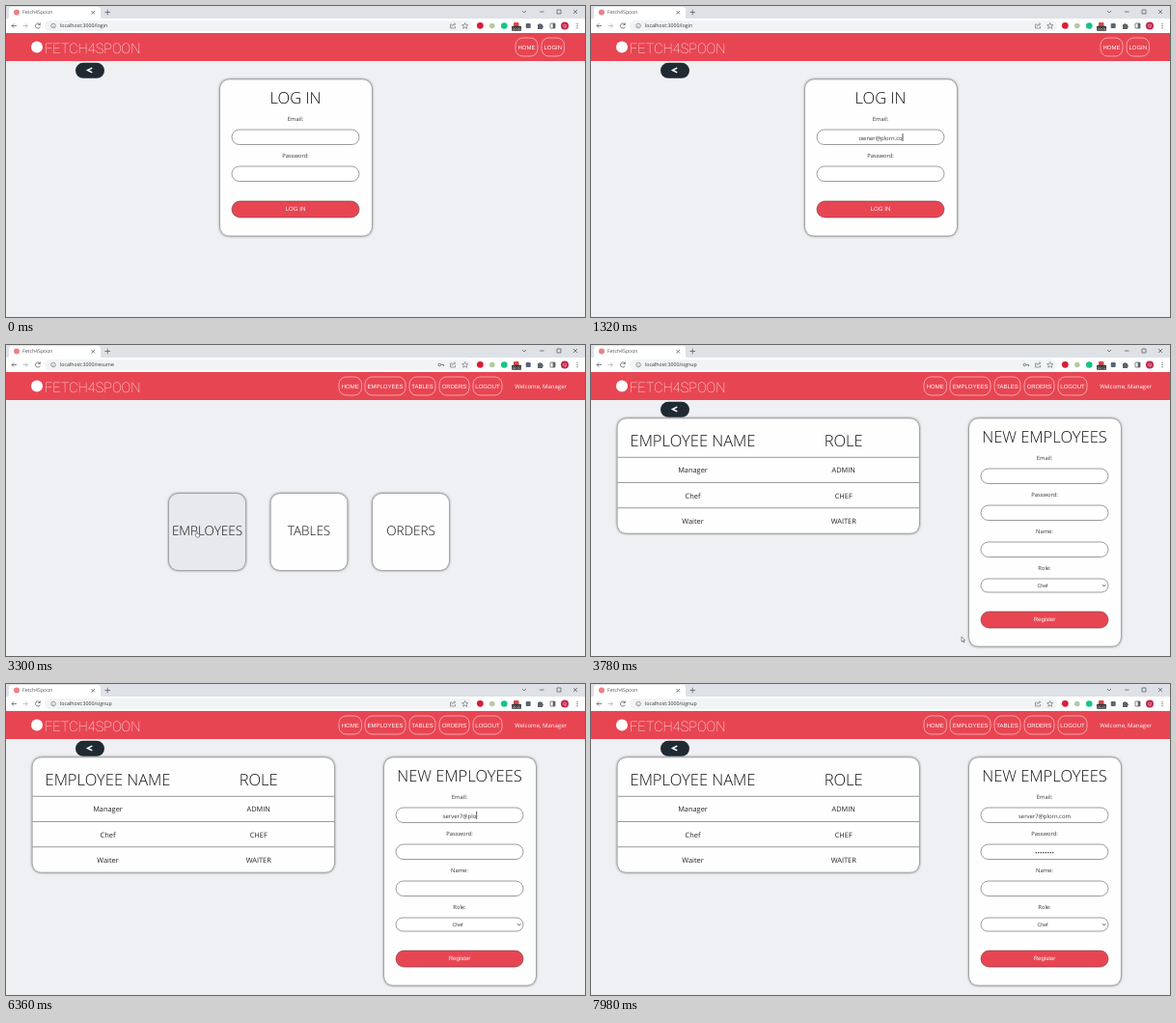
An HTML page that plays this animation: 600 by 322 pixels, repeating every 8 s.

```html
<!DOCTYPE html>
<html lang="en">
<head>
<meta charset="utf-8">
<title>Fetch4Spoon</title>
<style>
html, body { margin: 0; width: 100%; height: 100%; overflow: hidden; background: #eff0f3; }
svg { display: block; width: 600px; height: 322px; font-family: "Open Sans", sans-serif; text-rendering: geometricPrecision; }
.card { fill: #fefefe; filter: drop-shadow(0 0 1.6px #000d); }
.field { fill: #fff; stroke: #666; stroke-width: .65; }
.red { fill: #e84552; stroke: #6b3a42; stroke-width: .6; }
.nav { fill: none; stroke: #fff; stroke-width: .5; }
.arial { font-family: "Liberation Sans", Arial, sans-serif; }
.light { font-weight: 300; }
.line { fill: none; stroke: #5f6368; stroke-width: .8; }
</style>
</head>
<body>
<svg id="stage" viewBox="0 0 600 322"></svg>
<script>
const LOOP = 8000, RED = '#e84552';
const stage = document.getElementById('stage');

const rect = (x, y, w, h, r, attrs) =>
  `<rect x="${x}" y="${y}" width="${w}" height="${h}" rx="${r}" ${attrs}/>`;
const dot = (x, y, r, fill) => `<circle cx="${x}" cy="${y}" r="${r}" fill="${fill}"/>`;
const path = (d, attrs = 'class="line"') => `<path d="${d}" ${attrs}/>`;
const text = (s, x, y, size, attrs = '', anchor = 'middle') =>
  `<text x="${x}" y="${y}" font-size="${size}" text-anchor="${anchor}" ${attrs}>${s}</text>`;
const group = (id, body) => `<g id="${id}">${body}</g>`;
const arial = fill => `class="arial" fill="${fill}"`;
const light = 'class="light" fill="#111"';

const navButton = (s, x, w) =>
  rect(x, 33, w, 19, 7.5, 'class="nav"') + text(s, x + w / 2, 44.7, 6, arial('#fff'));
const input = (label, x, y, id, size = 5.9) =>
  text(label, x, y - 9, 5.8, 'fill="#333"') + rect(x - 66, y, 132, 15.5, 7.75, 'class="field"') +
  (id ? text('', x, y + 10.5, size, `id="${id}" fill="#333"`) : '');
const submit = (label, x, y) =>
  rect(x - 66, y, 132, 17, 8.5, 'class="red"') + text(label, x, y + 10.4, 6.1, arial('#fff'));
const tile = (label, x, id = '') =>
  rect(x, 154, 79, 79, 9, `class="card" id="${id}"`) + text(label, x + 39.5, 196.6, 13.5, light);

const browser =
  rect(0, 0, 600, 14, 0, 'fill="#dee1e6"') +
  path('M0 14Q3 14 3 11V4Q3 1 6 1H95Q98 1 98 4V11Q98 14 101 14Z', 'fill="#fff"') +
  rect(0, 13, 600, 15, 0, 'fill="#fff"') +
  dot(11, 6.5, 3, '#ee8088') + text('Fetch4Spoon', 17, 8.4, 5.2, 'fill="#555"', 'start') +
  path('M88.5 5l3.5 3.5m0-3.5l-3.5 3.5M102.5 6.5h5.5m-2.75-2.75v5.5') +
  path('M535 5l2 2 2-2M553 6h4.5M571 4h4v4h-4zM588 4l4 4m0-4l-4 4') +
  rect(40, 15, 443, 11, 5.5, 'fill="#f1f3f4"') +
  path('M11 20.5H6m2.2-2.2L6 20.5l2.2 2.2M35 19a2.5 2.5 0 1 0 .3 2.5M35.4 17.5V19.5H33.4') +
  path('M17.5 20.5h5m-2.2-2.2l2.2 2.2-2.2 2.2', 'class="line" style="stroke:#b5b8bc"') +
  path('M46.8 20.5a2.3 2.3 0 1 0 4.6 0a2.3 2.3 0 1 0-4.6 0M49.1 20.3v1.4', 'class="line" style="stroke-width:.6"') +
  text('', 56, 22.3, 5.25, 'id="address" fill="#333"', 'start') +
  group('key', path('M448 20.5a1.3 1.3 0 1 0 2.6 0a1.3 1.3 0 1 0-2.6 0M450.6 20.5h3v1.5')) +
  path('M462.5 19H460.5v4h5v-2M462 21.5q.3-2.5 3.5-2.7m-1.2-1.3l1.4 1.3-1.4 1.3', 'class="line" style="stroke-width:.6"') +
  path('M475.7 17.4l.9 2.1 2.2.2-1.7 1.4.6 2.2-2-1.2-2 1.2.6-2.2-1.7-1.4 2.2-.2Z', 'class="line" style="stroke-width:.6"') +
  dot(491.3, 20.3, 3.4, '#d51f37') + dot(503.8, 20.5, 2.8, '#b4c9a0') + dot(516.3, 20.5, 3.3, '#16c386') +
  rect(526, 17, 5.5, 4.5, 1, 'fill="#d7474c"') + rect(524, 20.8, 10, 5, .8, 'fill="#333"') +
  text('', 529, 24.6, 3.5, 'id="timer" fill="#fff"') +
  rect(538.7, 18, 5, 5, 1, 'fill="#596575"') +
  path('M551 19h1.4a1 1 0 1 1 2 0H556v1.5a1 1 0 1 1 0 2V24h-5Z', 'fill="#5f6368"') +
  rect(564, 18, 5, 5, .4, 'class="line"') + rect(566.6, 18, 2.4, 5, 0, 'fill="#5f6368"') +
  dot(579, 20.5, 4, '#c2274c') + text('Q', 579, 22.3, 4.6, arial('#fff')) +
  [18.3, 20.5, 22.7].map(y => dot(592, y, .65, '#5f6368')).join('');

const header = rect(0, 28, 600, 29, 0, `fill="${RED}"`) + dot(32, 42.5, 6, '#fff') +
  text('FETCH4SPOON', 40, 48.5, 14.5, 'style="font-family:Roboto,sans-serif;font-weight:200" fill="#fff"', 'start');

const back = group('back', rect(72, 58.8, 30, 16, 8, 'fill="#202a33"') +
  path('M89.3 64.1l-4.8 2.4 4.8 2.4', 'fill="none" stroke="#fff" stroke-width="1.5"'));

const login = navButton('HOME', 528, 23) + navButton('LOGIN', 555, 23.5) +
  rect(222, 76.3, 157, 161.5, 9, 'class="card"') + text('LOG IN', 300, 101, 16.5, light) +
  input('Email:', 300, 128, 'email') + input('Password:', 300, 166, 'pass', 6.6) + submit('LOG IN', 300, 202);

const staffNav = navButton('HOME', 345, 23.5) + navButton('EMPLOYEES', 372, 42) +
  navButton('TABLES', 418, 27) + navButton('ORDERS', 449, 31) + navButton('LOGOUT', 484, 30) +
  text('Welcome, Manager', 527.3, 44.7, 6, 'fill="#fff"', 'start');

const resume = tile('EMPLOYEES', 169, 'hover') + tile('TABLES', 274.5) + tile('ORDERS', 380);

const row = ([name, role], i) => path(`M27.5 ${116.3 + i * 26.2}H340`, 'stroke="#666" stroke-width=".65"') +
  text(name, 105.5, 132.4 + i * 26.2, 7.4, 'fill="#222"') + text(role, 261.7, 132.4 + i * 26.2, 7.4, 'fill="#222"');

const signup = rect(27.5, 76.3, 312.5, 118.5, 9, 'class="card"') +
  text('EMPLOYEE NAME', 105.5, 105, 16.5, light) + text('ROLE', 261.7, 105, 16.5, light) +
  [['Manager', 'ADMIN'], ['Chef', 'CHEF'], ['Waiter', 'WAITER']].map(row).join('') +
  rect(392, 76.3, 157, 235.5, 9, 'class="card"') + text('NEW EMPLOYEES', 470, 101, 16.5, light) +
  input('Email:', 470, 128, 'newEmail') + input('Password:', 470, 166, 'newPass', 6.6) + input('Name:', 470, 204) +
  text('Role:', 470, 233, 5.8, 'fill="#333"') + rect(404, 242, 132, 14, 7, 'class="field"') +
  text('Chef', 468, 250.8, 5.2, arial('#333')) +
  path('M530 248.2l1.7 1.7 1.7-1.7', 'fill="none" stroke="#222" stroke-width=".8"') +
  submit('Register', 470, 276);

const outline = 'fill="#fff" stroke="#333" stroke-width=".5"';
const pointer = group('pointer',
  group('arrow', path('M0 0V5.2L1.3 4.1L2.2 6.1L3 5.7L2.2 3.8H3.8Z', outline)) +
  group('hand', path('M0 0Q.6-.6 1.2 0V2.2L3.4 2.7Q3.9 2.9 3.7 3.7L3.2 6H.6L-1.1 3.7Q-1 2.9 0 3.5Z', outline)) +
  group('beam', path('M-1-3Q0-3 0-2.4Q0-3 1-3M0-2.4V2.4M-1 3Q0 3 0 2.4Q0 3 1 3', 'fill="none" stroke="#222" stroke-width=".6"')));

stage.innerHTML = rect(0, 0, 600, 322, 0, 'fill="#eff0f3"') + browser + header + back +
  group('login', login) + group('staffNav', staffNav) + group('resume', resume) + group('signup', signup) +
  path('', 'id="caret" stroke="#111" stroke-width=".7"') + pointer;

const el = Object.fromEntries([...stage.querySelectorAll('[id]')].filter(e => e.id).map(e => [e.id, e]));
const show = (id, on) => { el[id].style.display = on ? '' : 'none'; };

// Each field: text, focus time, first key, ms per key, blur time
const fields = {
  email: ['owner@plorn.com', 300, 470, 60, 1560],
  pass: ['•'.repeat(8), 1560, 1610, 90, 2500],
  newEmail: ['server7@plorn.com', 4920, 5690, 60, 6960],
  newPass: ['•'.repeat(8), 6960, 7000, 88, LOOP]
};

// Pointer stops: time, x, y
const trail = [
  [2460, 322, 262], [2640, 306.5, 208], [2760, 306.5, 208], [2940, 250, 261],
  [3240, 197, 193], [3420, 197, 193], [3720, 384, 302], [3900, 384, 302],
  [4080, 402, 286], [4320, 402, 286], [4500, 425, 248], [4860, 470, 136], [5690, 470, 136]
];

function drawField(id, t) {
  const [value, focus, start, step, blur] = fields[id];
  const count = Math.max(0, Math.min(value.length, Math.floor((t - start) / step)));
  el[id].textContent = value.slice(0, count);
  if (t < focus || t >= blur) return;
  const lastKey = count ? start + count * step : focus;
  if ((t - lastKey) % 360 >= 180) return;
  const x = +el[id].getAttribute('x') + (count ? el[id].getComputedTextLength() / 2 : 0) + .4;
  const y = el[id].getAttribute('y') - 6.5;
  el.caret.setAttribute('d', `M${x} ${y}v8`);
}

function drawPointer(t) {
  const i = trail.findIndex(p => p[0] > t);
  show('pointer', i > 0);
  if (i < 1) return;
  const [t0, x0, y0] = trail[i - 1], [t1, x1, y1] = trail[i];
  const u = (t - t0) / (t1 - t0), k = u * u * (3 - 2 * u);
  const x = x0 + (x1 - x0) * k, y = y0 + (y1 - y0) * k;
  const inside = (l, top, w, h) => x > l && x < l + w && y > top && y < top + h;
  const hover = t >= 2820 && t < 3420 && inside(169, 154, 79, 79);
  const hand = hover || t < 2820 && inside(234, 202, 132, 17);
  const beam = t > 3420 && [128, 166, 204].some(top => inside(404, top, 132, 15.5));
  el.pointer.setAttribute('transform', `translate(${x} ${y})`);
  el.hover.style.fill = hover ? '#e7e9ec' : '';
  show('hand', hand);
  show('beam', beam);
  show('arrow', !hand && !beam);
}

function draw(now) {
  const t = now % LOOP;
  const page = t < 2820 ? 'login' : t < 3420 ? 'resume' : 'signup';
  for (const id of ['login', 'resume', 'signup']) show(id, id === page);
  show('staffNav', page !== 'login');
  show('back', page !== 'resume');
  show('key', t >= 2520 && t < 4500);
  el.address.textContent = 'localhost:3000/' + page;
  el.timer.textContent = '00:' + String(Math.floor(t / 310)).padStart(2, '0');
  el.caret.setAttribute('d', '');
  for (const id in fields) drawField(id, t);
  drawPointer(t);
  requestAnimationFrame(draw);
}
requestAnimationFrame(draw);
</script>
</body>
</html>
```
